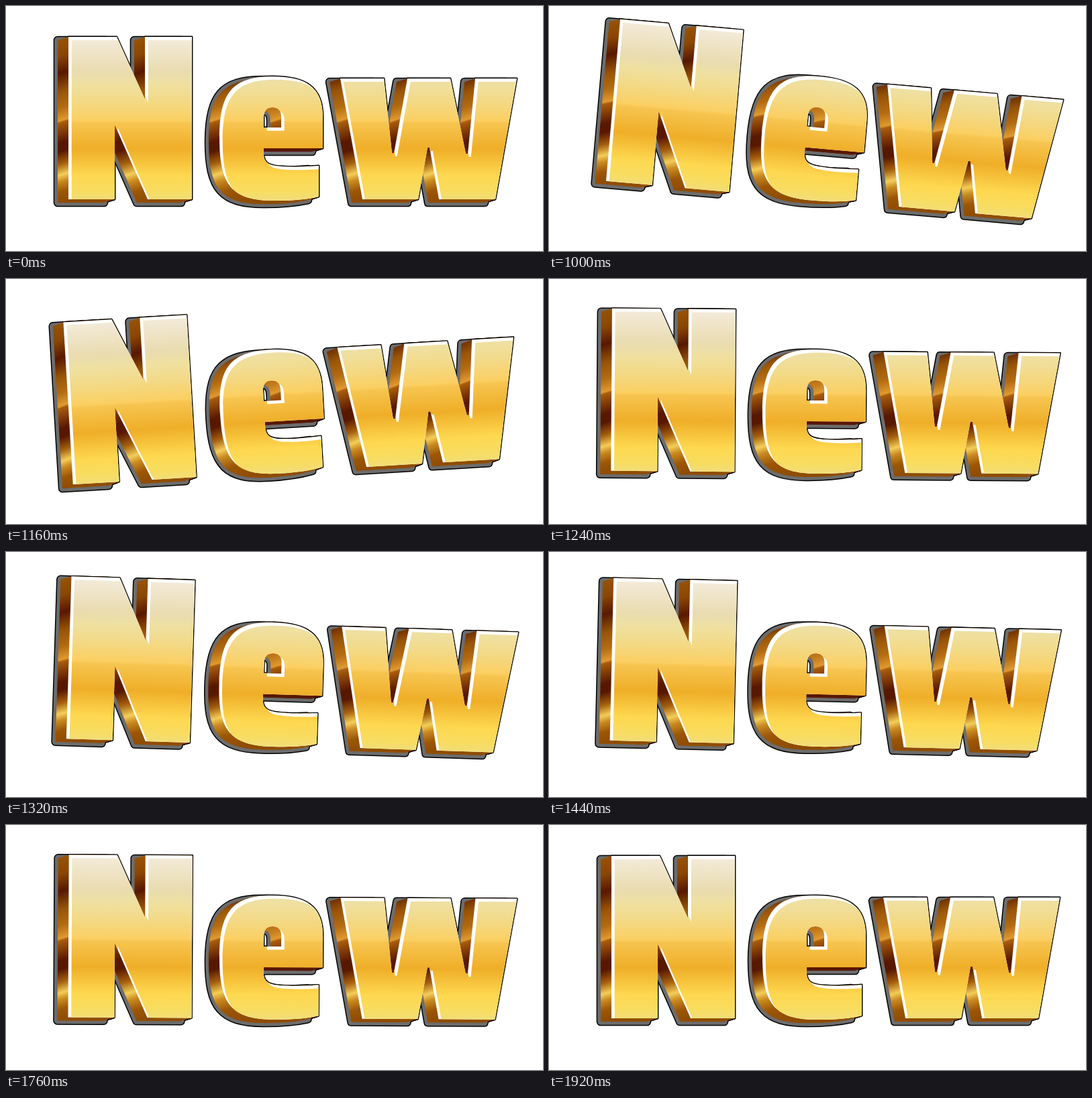
An HTML page with a canvas for the animation above (1960 ms loop, 800x365 px).

```html
<!DOCTYPE html>
<html lang="en">
<head>
<meta charset="utf-8">
<title>New</title>
<style>
  html, body { margin: 0; width: 100%; height: 100%; overflow: hidden; background: #fff; }
  canvas { display: block; }
</style>
</head>
<body>
<canvas id="stage" width="800" height="365" role="img" aria-label="New"></canvas>
<script>
const ctx = document.getElementById('stage').getContext('2d');

const FRAME = 40, REST = 24, LOOP = 49;       // frame length in ms, then counts of frames
const KICK = [0, 5, 8.2, 4, -1, -3.4, -2.2, 0.4, 2];   // first swings, degrees per frame
const DEPTH = { x: -16, y: 5 };
const GLINT = 4.7;

const letters = new Path2D(
  // N
  'M93 46H165L207 139V46H277V288H211L162 177V288H93Z' +
  // e with its counter
  'M472 212V165C472 120 446 105 397 105C338 105 318 128 318 197' +
  'C318 268 337 290 400 290C430 290 448 288 466 284V238' +
  'C440 240 425 240 412 239C392 238 385 234 384 222V212Z' +
  'M384 181V166C384 155 389 151 397 151C406 151 410 156 410 165V181Z' +
  // w
  'M498 108H563L575 219H578L598 108H662L685 220H688L699 108H761' +
  'L729 288H645L631 211H628L614 288H531Z'
);

function vertical(stops) {
  const top = 46, height = 246;
  const gradient = ctx.createLinearGradient(0, top, 0, top + height);
  for (const [y, colour] of stops) gradient.addColorStop((y - top) / height, colour);
  return gradient;
}

const gold = vertical([
  [46, '#f3ead8'], [92, '#e9dcb0'], [112, '#efe0a0'], [138, '#f3d985'],
  [166, '#fbcf62'], [170, '#f6c550'], [208, '#efae28'], [248, '#fed850'],
  [270, '#f8dc60'], [290, '#efde82']
]);
const bronze = vertical([
  [46, '#985204'], [70, '#8a4604'], [96, '#581800'], [108, '#723204'],
  [124, '#985408'], [148, '#b46c12'], [167, '#e09a30'], [170, '#a85c0c'],
  [200, '#581800'], [213, '#581800'], [232, '#a5600e'], [248, '#f4cd58'],
  [258, '#c98a20'], [273, '#9c5606'], [292, '#8c4a00']
]);

function outline(colour, width) {
  ctx.strokeStyle = ctx.fillStyle = colour;
  ctx.lineWidth = width;
  ctx.lineJoin = 'round';
  ctx.fill(letters, 'evenodd');
  ctx.stroke(letters);
}

// Calls paint for each layer of the block, from back to front.
function extrude(paint) {
  const steps = -DEPTH.x;
  for (let i = steps; i >= 0; i--) {
    ctx.save();
    ctx.translate(DEPTH.x * i / steps, DEPTH.y * i / steps);
    paint();
    ctx.restore();
  }
}

function atBack(paint) {
  ctx.save();
  ctx.translate(DEPTH.x, DEPTH.y);
  paint();
  ctx.restore();
}

function drawWord() {
  atBack(() => outline('#000', 12.6));
  extrude(() => outline('#000', 2.8));
  atBack(() => outline('#6c6c6c', 9.6));
  extrude(() => {
    ctx.fillStyle = bronze;
    ctx.fill(letters, 'evenodd');
  });

  // White face with a shifted gold face leaves the glints on upper left edges.
  ctx.fillStyle = '#fff';
  ctx.fill(letters, 'evenodd');
  ctx.save();
  ctx.clip(letters, 'evenodd');
  ctx.translate(GLINT, GLINT);
  ctx.fillStyle = gold;
  ctx.fill(letters, 'evenodd');
  ctx.restore();
}

function angleAt(frame) {
  const n = frame - REST;
  if (n <= 0) return 0;
  if (n < KICK.length) return KICK[n];
  return 2 * Math.max(0, (24 - n) / 16) ** 1.4;
}

function render(now) {
  const frame = Math.floor(now / FRAME) % LOOP;
  ctx.setTransform(1, 0, 0, 1, 0, 0);
  ctx.fillStyle = '#fff';
  ctx.fillRect(0, 0, 800, 365);
  ctx.translate(400, 182.5);
  ctx.rotate(angleAt(frame) * Math.PI / 180);
  ctx.translate(-400, -182.5);
  drawWord();
}

const start = performance.now();
function tick() {
  render(performance.now() - start);
  requestAnimationFrame(tick);
}
tick();
</script>
</body>
</html>
```
